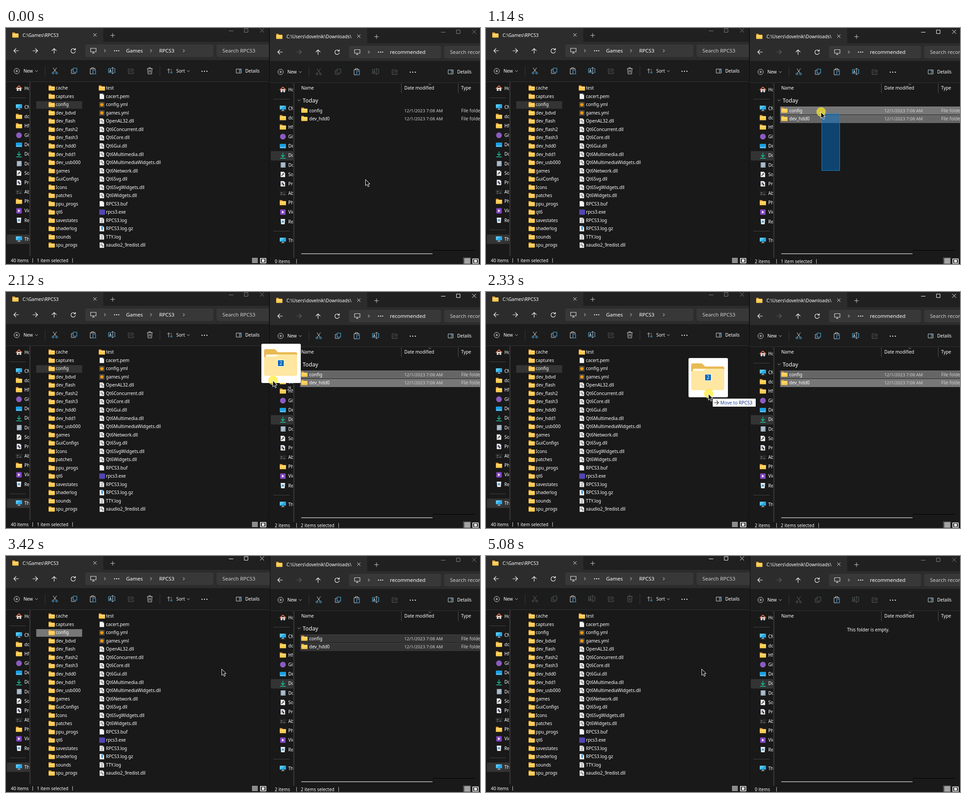
These frames come from a looping animation (1058 px wide and 529 px high, 6800 ms). An HTML page with a canvas:

```html
<!DOCTYPE html>
<html lang="en">
<head>
<meta charset="utf-8">
<title>Move folders</title>
<style>
html, body { margin: 0; width: 100%; height: 100%; overflow: hidden; background: #191919; }
canvas { display: block; }
</style>
</head>
<body>
<canvas id="stage" width="1058" height="529"></canvas>
<script>
const ctx = document.getElementById('stage').getContext('2d');
const LOOP = 6800, RIGHT = 589;
const WHITE = '#fff', DIM = '#606060', BLUE = '#4cb5f0', YELLOW = '#ffcb4f';

// ---- drawing helpers; text is placed by its left edge and vertical centre
function text(s, x, y, size = 10, color = WHITE) {
  ctx.font = `${size}px "Noto Sans", sans-serif`;
  ctx.fillStyle = color;
  ctx.fillText(s, x, Math.round(y + size * 0.36));
  return ctx.measureText(s).width;
}
function box(x, y, w, h, color, r = 0) {
  ctx.fillStyle = color;
  ctx.beginPath();
  ctx.roundRect(x, y, w, h, r);
  ctx.fill();
}
function disc(x, y, r, color) {
  ctx.fillStyle = color;
  ctx.beginPath();
  ctx.arc(x, y, r, 0, 7);
  ctx.fill();
}
function line(d, x, y, color = WHITE, width = 1) {
  ctx.save();
  ctx.translate(x, y);
  ctx.strokeStyle = color;
  ctx.lineWidth = width;
  ctx.stroke(new Path2D(d));
  ctx.restore();
}
function shape(d, x, y, color) {
  ctx.save();
  ctx.translate(x, y);
  ctx.fillStyle = color;
  ctx.fill(new Path2D(d));
  ctx.restore();
}
function clipped(x, y, w, h, draw) {
  ctx.save();
  ctx.beginPath();
  ctx.rect(x, y, w, h);
  ctx.clip();
  draw();
  ctx.restore();
}
const chevronRight = (x, y) => line('M-2-3L1.5 0L-2 3', x, y, '#ddd');
const chevronDown = (x, y, c = '#bbb') => line('M-3-1.5L0 1.5L3-1.5', x, y, c);
const cross = (x, y, r, c) => line(`M${-r}${-r}L${r} ${r}M${r}${-r}L${-r} ${r}`, x, y, c);
const dots = (x, y, gap) => [-gap, 0, gap].forEach(d => disc(x + d, y, 1.2, WHITE));
const column = (x, y, h, color = '#3a3a3a') => box(x, y, 1, h, color);

// ---- small icons, centred on x, y
function page(x, y, color = '#f2f2f2') {
  shape('M-5-6H2L5-3V6H-5Z', x, y, color);
  shape('M2-6V-3H5Z', x, y, '#b5b5b5');
}
const icons = {
  folder(x, y) {
    shape('M-7-5Q-7-6-6-6H-2L0-4H6Q7-4 7-3V3H-7Z', x, y, '#e9a52f');
    box(x - 7, y - 3, 14, 8.5, YELLOW, 1);
    box(x - 6, y - 2.5, 12, 2, '#ffe08c');
  },
  home(x, y) {
    box(x - 5, y - 1, 10, 7, '#d9d9d9');
    line('M-7 1L0-5.5L7 1', x, y, '#e0704a', 2);
    box(x - 1.5, y + 2, 3, 4, '#555');
  },
  pc(x, y) {
    box(x - 7, y - 6, 14, 9, '#2aa5e0', 1);
    shape('M-7 3V-6H5Z', x, y, '#56c6f2');
    box(x - 1, y + 3, 2, 2, '#bbb');
    box(x - 4, y + 5, 8, 1, '#bbb');
  },
  mark: (x, y) => disc(x, y, 6.5, '#8a5bc0'),
  desktop(x, y) {
    box(x - 7, y - 5, 14, 10, '#1d9fe0', 1);
    [-5, -1, 3].forEach(d => box(x + d, y + 2, 2, 2, '#bfeaff'));
  },
  download: (x, y) => line('M0-6V3M-4-1L0 3L4-1M-6 6H6', x, y, '#20b897', 1.6),
  document(x, y) {
    box(x - 5, y - 6, 11, 12, '#8fa3b3', 1);
    line('M-3-3H4M-3 0H4M-3 3H2', x, y, '#e9f2f8');
  },
  tool(x, y) {
    page(x, y);
    line('M-3 3L2-2', x, y, '#555', 2);
    disc(x + 1, y - 1, 2, '#666');
  },
  script(x, y) {
    page(x, y);
    box(x - 3, y - 3, 4, 5, '#735b88');
    box(x, y, 3, 4, '#444');
  },
  app(x, y) {
    box(x - 7, y - 5, 14, 10, '#292929', 1);
    line('M-5-1H-1M-5 3H-2M1 3H5', x, y, '#8b9bac');
  },
  video(x, y) {
    box(x - 6, y - 6, 12, 12, '#8746c5', 1);
    shape('M-2-3L3 0L-2 3Z', x, y, '#fff');
  },
  bin(x, y) {
    shape('M-5-6H5L4 6H-4Z', x, y, '#e3e8ec');
    box(x - 2, y - 2, 4, 4, '#2c91d4');
  },
  file: (x, y) => page(x, y),
  yml(x, y) {
    box(x - 6, y - 6, 12, 12, '#4a4a4a', 1);
    disc(x, y, 3.6, '#ff9800');
  },
  dll(x, y) {
    page(x, y);
    disc(x - 1, y - 1, 2.4, '#808890');
    disc(x + 2, y + 2, 1.8, '#808890');
    disc(x - 1, y - 1, 1, WHITE);
  },
  exe: (x, y) => box(x - 6, y - 6, 13, 12, '#5146b5', 2),
  log(x, y) {
    page(x, y);
    line('M-3-3.5H2M-3-1.5H3M-3 .5H3M-3 2.5H3M-3 4.5H3', x, y, '#888', 0.8);
  },
  gz(x, y) {
    page(x, y);
    box(x - 1, y - 5, 3, 8, '#3d8fd1');
  }
};

const sidebar = [
  ['CM', 'pc'], ['do', 'folder'], ['HN', 'folder'], ['Git', 'mark'], ['Des', 'desktop'], ['Dow', 'download'],
  ['Doc', 'document'], ['Sou', 'tool'], ['Pro', 'script'], ['Abc', 'app'], ['Pho', 'folder'], ['Vid', 'video'], ['Rec', 'bin']
];
const folders = ('cache captures config dev_bdvd dev_flash dev_flash2 dev_flash3 dev_hdd0 dev_hdd1 dev_usb000 ' +
  'games GuiConfigs Icons patches ppu_progs qt6 savestates shaderlog sounds spu_progs').split(' ');
const files = ('test cacert.pem config.yml games.yml OpenAL32.dll Qt6Concurrent.dll Qt6Core.dll Qt6Gui.dll ' +
  'Qt6Multimedia.dll Qt6MultimediaWidgets.dll Qt6Network.dll Qt6Svg.dll Qt6SvgWidgets.dll Qt6Widgets.dll ' +
  'RPCS3.buf rpcs3.exe RPCS3.log RPCS3.log.gz TTY.log xaudio2_9redist.dll').split(' ');
const fileIcon = name => !name.includes('.') ? icons.folder : icons[name.split('.').pop()] || icons.file;

// ---- window parts shared by both windows
function titleBar(x, y, path, buttonX, focused) {
  box(x, 0, 589, 32 + y, '#202020');
  box(x, 0, 217, 32 + y, '#2c2c2c');
  box(x, 31 + y, 589, 41, '#2c2c2c');
  icons.folder(x + 21, y + 16);
  clipped(x, 0, 182, 40, () => text(path, x + 37, y + 16, 10.2));
  cross(x + 198.5, y + 15.5, 3.5, WHITE);
  line('M-5 0H5M0-5V5', x + 238, y + 16.5, '#ccc');
  const c = focused ? WHITE : '#858585';
  line('M-5 0H5', buttonX, y + 6.5, c);
  line('M-4-4H4V4H-4Z', buttonX + 33.5, y + 5.5, c);
  cross(buttonX + 69, y + 5.5, 4.5, c);
}
function navigation(x, y, forward, boxWidth, search) {
  line('M6 0H-5M0-5L-5 0L0 5', x + 22.5, y + 51, WHITE, 1.2);
  line('M-6 0H5M0-5L5 0L0 5', x + 65.5, y + 51, forward, 1.2);
  line('M0 6V-5M-5 0L0-5L5 0', x + 107.5, y + 51, WHITE, 1.2);
  line('M4.5-2A5 5 0 1 0 5 1M5-6V-2H1', x + 150, y + 51, WHITE, 1.2);
  box(x + 177, y + 37, boxWidth, 28, '#383838', 4);
  box(x + 389 + (x ? 0 : 81), y + 37, 130, 28, '#383838', 4);
  text(search, x + (x ? 402 : 483), y + 51, 11.5, '#d0d0d0');
  line('M-6-5H6V3H-6ZM-3 6H3M0 3V6', x + 195, y + 50.5, '#ddd', 1.2);
  chevronRight(x + 221, y + 51);
  dots(x + 247, y + 51, 4.5);
}
function toolbar(x, y, enabled) {
  const c = enabled ? '#ddd' : DIM, accent = enabled ? BLUE : '#4b5a63';
  box(x, y + 72, 589, 49, '#1c1c1c');
  box(x, y + 120, 589, 1, '#333');
  line('M6 0A6 6 0 1 0-6 0A6 6 0 1 0 6 0M-3 0H3M0-3V3', x + 24, y + 96.5, '#ddd');
  text('New', x + 39, y + 96.5);
  chevronDown(x + 68, y + 96.5);
  column(x + 87, y + 85, 23);
  line('M-4-7L3 3M4-7L-3 3', x + 109, y + 96, c);
  line('M-2 5A2 2 0 1 0-6 5A2 2 0 1 0-2 5M6 5A2 2 0 1 0 2 5A2 2 0 1 0 6 5', x + 109, y + 96, accent, 1.2);
  line('M-2-6H6V3H-2Z', x + 152, y + 96, accent, 1.2);
  line('M-3-3H-6V6H3V4', x + 152, y + 96, c);
  line('M2-5H5V-2M-2-5H-6V7H-1M-3-7H2V-4H-3Z', x + 194, y + 96, '#ddd');
  line('M0-1H6V7H0Z', x + 194, y + 96, BLUE, 1.2);
  line('M0-5H-7V4H0M4-5H7V4H4', x + 236, y + 96, accent, 1.2);
  line('M2-7V6M0-7H4M0 6H4M-5 3L-3-3L-1 3M-4 1H-2', x + 236, y + 96, c);
  line('M-1-4H-6V6H5V2M-3 3Q-2-2 3-2M1-6L6-2L1 2', x + 279, y + 96, '#5c666c');
  const detailsX = x ? x + 418 : 534;
  if (!x) {
    line('M-6-5H6M-5-5L-4 7H4L5-5M-2-5V-7H2V-5M-1.5-2V4M1.5-2V4', 321, 96, c);
    column(343, 85, 23);
    line('M-3 5V-5M-6-2L-3-5L0-2', 366, 96.5, '#ddd');
    line('M3-5V5M0 2L3 5L6 2', 366, 96.5, BLUE);
    text('Sort', 380, 96.5);
    chevronDown(407, 96.5);
  }
  dots(x ? x + 319 : 443, y + 97, 5.5);
  line('M-5-4H6V5H-5Z', detailsX - 15, y + 96, '#ddd');
  line('M2-4V5M2-2H6M2 1H6', detailsX - 15, y + 96, BLUE, 1.2);
  text('Details', detailsX, y + 96.5);
}
function sidePanel(x, y, selectedY) {
  box(x + 2, y + selectedY - 10, 50, 21, '#333', 2);
  clipped(x, 110, 51.5, 410, () => {
    const item = (label, icon, itemY) => {
      icons[icon](x + 29, y + itemY);
      text(label, x + 41, y + itemY);
    };
    item('Ho', 'home', 135);
    sidebar.forEach(([label, icon], i) => item(label, icon, 177 + i * 21.17));
    item('Th', 'pc', 473);
    box(x + 8, y + 156, 36, 1, '#444');
    box(x + 8, y + 452, 36, 1, '#444');
  });
  box(x + 52, y + 121, 3, 391, '#303030');
}
function statusBar(x, y, count, selection) {
  text(count, x + 11, y + 521.5, 9.9);
  column(x + 59, y + 516, 10, '#ccc');
  if (!selection) return;
  const width = text(selection, x + 69, y + 521.5, 9.9);
  column(x + 78 + Math.round(width), y + 516, 10, '#ccc');
}
function viewButtons(x, y) {
  line('M-6-5H7M-6-2H7M-6 1H7M-6 4H7', x, y, WHITE, 1.6);
  line('M-6-5H6V5H-6Z', x + 19, y, WHITE, 1.6);
  box(x + 16, y - 3, 6, 6, WHITE);
}

function leftWindow(t) {
  const cleared = t >= 4940, moved = t >= 3850;
  box(0, 0, 589, 529, '#191919');
  titleBar(0, 0, 'C:\\Games\\RPCS3', 502.5, t >= 3420);
  navigation(0, 0, WHITE, 286, 'Search RPCS3');
  text('Games', 268, 51, 11.5);
  chevronRight(324, 51);
  text('RPCS3', 342, 51, 11.3);
  chevronRight(397, 51);
  toolbar(0, 0, !cleared);
  sidePanel(0, 0, 473);
  const rowY = i => 134.7 + i * 18.53;
  const highlight = (row, color) => box(67.5, Math.round(rowY(row)) - 8, 102.5, 17, color);
  if (!cleared) {
    highlight(2, moved ? '#5f5f5f' : t >= 3420 ? '#777' : '#343434');
    if (moved) highlight(7, '#777');
  }
  folders.forEach((name, i) => {
    icons.folder(102, rowY(i));
    text(name, 111, rowY(i));
  });
  files.forEach((name, i) => {
    fileIcon(name)(214, rowY(i));
    text(name, 223, rowY(i));
  });
  statusBar(0, 0, '40 items', cleared ? '' : moved ? '2 items selected' : '1 item selected');
  viewButtons(555, 521.5);
}

function rowShades(t) {
  if (t < 1070 || t >= 3750) return [null, null];
  if (t < 1140) return [null, '#666'];
  if (t < 1490) return ['#777', '#666'];
  if (t < 1630) return ['#777', '#777'];
  return t < 3420 ? ['#666', '#777'] : ['#343434', '#343434'];
}
function rightWindow(t) {
  const shades = rowShades(t), selected = t >= 1070 && t < 3750;
  titleBar(RIGHT, 3, 'C:\\Users\\dovelnik\\Downloads\\', 976, t >= 860 && t < 3420);
  navigation(RIGHT, 3, DIM, 205, 'Search recommended');
  text('recommended', 857, 54, 11.5);
  toolbar(RIGHT, 2, selected);
  sidePanel(RIGHT, 3, 283);

  text('Name', 659, 134.5);
  text('Date modified', 889, 134.5);
  text('Type', 1016, 134.5);
  column(882, 124, 22, '#555');
  column(1009, 124, 22, '#555');
  chevronDown(946, 126, '#999');

  if (t < 3750) {
    chevronDown(654, 162);
    text('Today', 662, 162, 12.6);
    ['config', 'dev_hdd0'].forEach((name, i) => {
      const y = 185 + i * 18.5;
      if (shades[i]) {
        const top = Math.round(y - 9);
        box(656.5, top, 402, 18, shades[i]);
        box(656.5, top, 402, 1, 'rgba(255,255,255,.1)');
      }
      icons.folder(666, y - 0.5);
      text(name, 677, y);
      text('12/1/2023 7:08 AM', 889, y, 9.8, '#d0d0d0');
      text('File folder', 1016, y, 10, '#d0d0d0');
    });
  } else {
    text('This folder is empty.', 806, 165.5);
  }
  box(659, 505, 293, 2, '#9b9b9b');
  box(952, 498, 94, 1, '#000');
  const listed = t >= 860 && t < 3750;
  statusBar(RIGHT, 2, listed ? '2 items' : '0 items',
    !selected ? '' : t < 1210 ? '1 item selected' : '2 items selected');
  box(1020, 514, 18, 15, '#4a4a4a');
  viewButtons(1029, 522.5);
}

// ---- pointer: time, x, y
const path = [
  [235, 803, 339], [660, 789, 319], [860, 789, 319], [930, 786, 303], [1000, 775, 258], [1070, 758, 206],
  [1140, 748, 188], [1210, 745, 184], [1350, 743, 190], [1490, 743, 202], [1630, 743, 202], [1770, 735, 201],
  [1910, 705, 200], [2050, 640, 198], [2120, 596, 198], [2190, 545, 198], [2260, 513, 211], [2330, 497, 228],
  [2400, 488, 240], [2470, 484, 248], [2540, 482, 252], [2610, 482, 253]
];
function pointerAt(t) {
  // the pointer moves in steps
  const [start, step] = t < 860 ? [235, 85] : [860, 70];
  const s = start + Math.floor((t - start) / step) * step;
  const next = path.findIndex(p => p[0] > s);
  if (next === 0) return path[0].slice(1);
  if (next < 0) return path.at(-1).slice(1);
  const [a, b] = [path[next - 1], path[next]], k = (s - a[0]) / (b[0] - a[0]);
  return [1, 2].map(i => Math.round(a[i] + (b[i] - a[i]) * k));
}
function dragTile(x, y) {
  box(x, y, 88, 88, '#fff', 3);
  shape('M6 16Q6 12 10 12H28Q31 12 33 15L37 19H76Q80 19 80 23V50H6Z', x, y, '#e8ba55');
  box(x + 10, y + 24, 66, 20, '#fff8df', 2);
  const g = ctx.createLinearGradient(x + 6, y + 24, x + 60, y + 80);
  g.addColorStop(0, '#ffe7a2');
  g.addColorStop(1, '#f8d470');
  shape('M6 32Q6 29 9 29H33L39 24H77Q80 24 80 27V68Q80 72 76 72H10Q6 72 6 68Z', x, y, g);
  box(x + 36, y + 36, 15, 15, '#fff');
  box(x + 37, y + 37, 13, 13, '#0a68b8');
  text('2', x + 40.7, y + 43.5, 10, '#fff');
}
function dropHint(x, y) {
  box(x, y, 96, 18, '#fff', 1);
  line('M3 9H13M8.5 4.5L13 9L8.5 13.5', x, y, '#222', 1.1);
  const width = text('Move to ', x + 17, y + 9, 10.2, '#2347a0');
  text('RPCS3', x + 17 + width, y + 9, 10.2, '#132f85');
}
function pointer(t) {
  const [x, y] = pointerAt(t), dragging = t >= 1630 && t < 3420;
  if (t >= 930 && t < 1350) {
    const w = 788 - x, h = 315 - y;
    box(x + 1, y + 4, w, h, 'rgba(0,120,215,.45)');
    line(`M0 0H${w}V${h}H0Z`, x + 1.5, y + 4.5, '#1f86c9');
  }
  if (dragging) {
    const settled = t >= 2190;
    dragTile(x - (settled ? 45 : 26), y - (settled ? 80 : 82));
    if (settled) dropHint(x + 9, y + 11);
    else if (t >= 2120) line('M-4 4L4-4M-2-4H4V2', x + 35, y + 19, '#777', 2);
  }
  if (dragging || (t >= 860 && t < 1350) || (t >= 4940 && t < 5080))
    disc(x, y, 10.5, 'rgba(255,235,40,.7)');
  const arrow = 'M0 .5V14.5L3.2 11.5L5.5 16.8L7.9 15.8L5.6 10.6H9.8Z';
  shape(arrow, x - 0.5, y, '#111');
  line(arrow, x - 0.5, y, '#fff');
}

function frame(now) {
  const t = now % LOOP, edge = t >= 3420 ? 589 : 587;
  box(0, 0, 1058, 529, '#191919');
  rightWindow(t);
  clipped(0, 0, edge, 529, () => leftWindow(t));
  column(edge, 0, 529, '#0c0c0c');
  pointer(t);
  requestAnimationFrame(frame);
}
requestAnimationFrame(frame);
</script>
</body>
</html>
```
